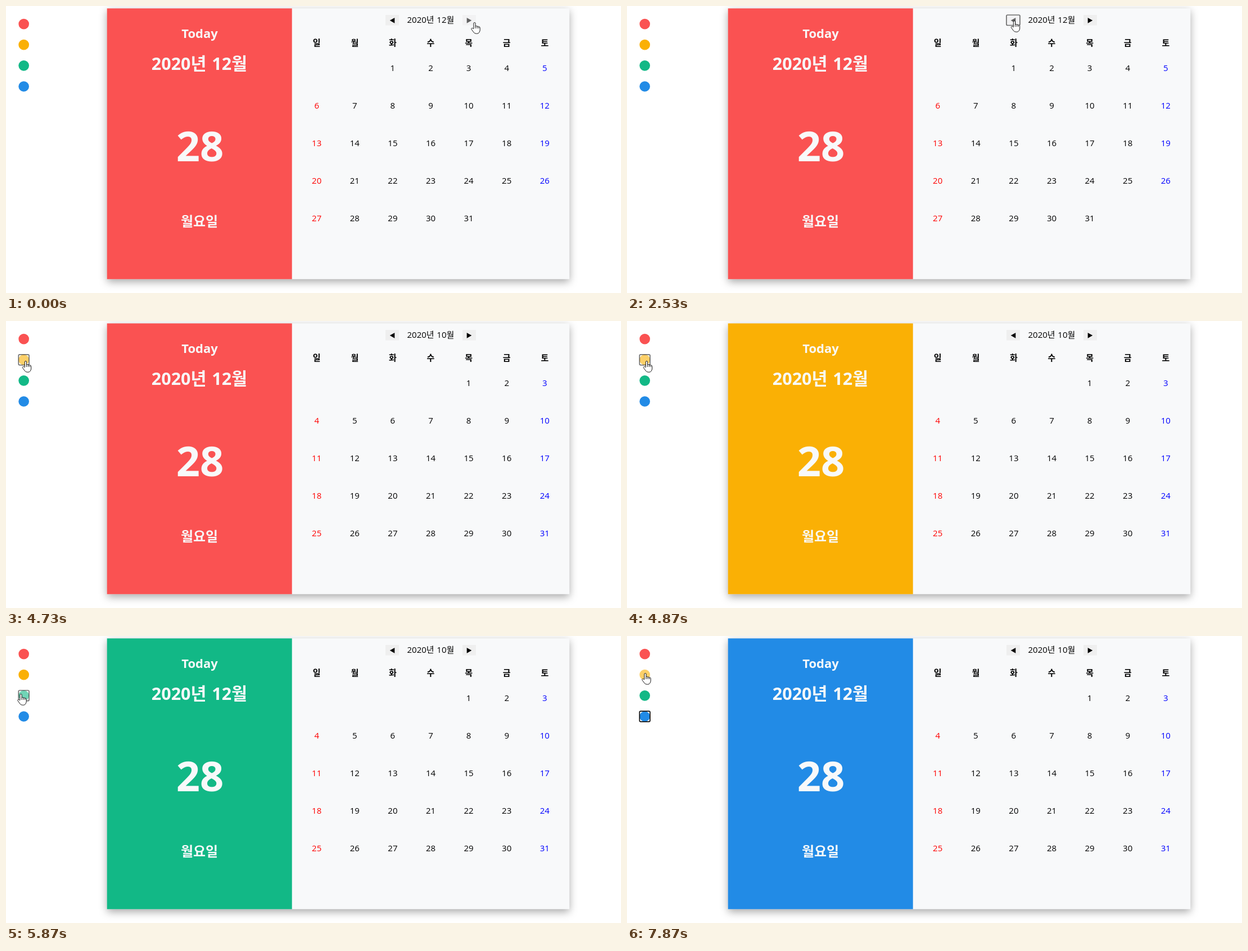
These frames come from a looping animation (1094 by 512 pixels, 8000 ms). An HTML page with a canvas:

```html
<!DOCTYPE html>
<html lang="ko">
<head>
<meta charset="utf-8">
<style>
  html, body { margin: 0; width: 100%; height: 100%; overflow: hidden; background: #fff; }
  canvas { display: block; }
</style>
</head>
<body>
<canvas id="stage" width="1094" height="512"></canvas>
<script>
const ctx = document.getElementById('stage').getContext('2d');
const FONT = '"Open Sans", "Noto Sans CJK KR", "Noto Sans CJK", sans-serif';
const LOOP = 8000, TICKS_PER_SECOND = 15;
const COLORS = ['#fa5252', '#fab005', '#12b886', '#228be6'];
const DAYS = [...'일월화수목금토'];

// Mouse presses, in ticks. An arrow loses focus on release, a dot keeps it.
const click = (down, up, id) => ({ down, up, id });
const CLICKS = [
  click(1, 1, 'next'), click(13, 14, 'next'),
  click(28, 29, 'prev'), click(32, 34, 'prev'), click(38, 39, 'prev'), click(42, 44, 'prev'),
  click(71, 73, 1), click(87, 88, 2), click(99, 101, 3)
];

// Pointer trips: eased from the previous stop, bowed sideways by (bowX, bowY).
const trip = (start, end, x, y, bowX = 0, bowY = 0) => ({ start, end, x, y, bowX, bowY });
const TRIPS = [
  trip(0, 0, 833.5, 29.5),
  trip(4, 11, 828, 29),
  trip(14, 25, 689, 26.5),
  trip(51, 64, 38, 93, 0, 110),
  trip(64, 70, 35, 71.5),
  trip(76, 86, 26.5, 103.5, -5),
  trip(90, 98, 33.7, 134.5, -20),
  trip(106, 118, 32.5, 66.5, 34, -20)
];

const HAND = new Path2D('M-1.6 11V1.6Q-1.6 0 0 0T1.6 1.6V7Q1.8 5.8 3.1 5.9T4.6 7.4Q4.8 6.4 6 6.6T7.4 8' +
  'Q7.7 7.2 8.6 7.5T9.7 9.2V13.5Q9.7 15.5 8.2 17.6Q7.4 19.8 4 19.8Q0 19.8-1.3 17.8L-5.4 12.2' +
  'Q-6.2 10.7-5 10.1T-2.8 10.6ZM1.6 7V10.5M4.6 7.4V10.5M7.4 8V10.5');
const ARROW = new Path2D('M0 0V15.6L3.6 12.2L6.1 18L8.5 17L6.1 11.3H11Z');

function pointerAt(tick) {
  const i = TRIPS.findLastIndex(t => t.start <= tick);
  const to = TRIPS[i], from = TRIPS[Math.max(i - 1, 0)];
  const k = Math.min(1, (tick - to.start) / (to.end - to.start || 1));
  const ease = k * k * (3 - 2 * k), bow = Math.sin(Math.PI * k);
  return [from.x + (to.x - from.x) * ease + to.bowX * bow, from.y + (to.y - from.y) * ease + to.bowY * bow];
}

function stateAt(tick) {
  const state = { months: 0, theme: 0, focus: null };
  for (const { down, up, id } of CLICKS) {
    const isDot = typeof id === 'number', released = tick >= up;
    if (tick >= down) state.focus = isDot || !released ? id : null;
    if (!released) continue;
    if (isDot) state.theme = id;
    else state.months += id === 'next' ? 1 : -1;
  }
  return state;
}

function text(value, x, y, size, color, weight = 400) {
  ctx.font = `${weight} ${size}px ${FONT}`;
  ctx.wordSpacing = `${size * 0.06}px`;
  ctx.fillStyle = color;
  ctx.fillText(value, x, y);
}

function box(x, y, w, h, color) {
  ctx.fillStyle = color;
  ctx.fillRect(x, y, w, h);
}

function drawButton({ x, y, w, h, dir, color }, hovered, focused) {
  const cx = x + w / 2, cy = y + h / 2;
  ctx.globalAlpha = hovered ? 0.6 : 1;
  if (dir) {
    box(x, y, w, h, '#efefef');
    ctx.fillStyle = '#000';
    ctx.beginPath();
    ctx.moveTo(cx + 4.3 * dir, cy + 0.6);
    ctx.lineTo(cx - 4.3 * dir, cy - 4.2);
    ctx.lineTo(cx - 4.3 * dir, cy + 5.4);
    ctx.fill();
  } else {
    ctx.fillStyle = color;
    ctx.beginPath();
    ctx.arc(cx, cy, w / 2, 0, 7);
    ctx.fill();
  }
  if (focused) {
    ctx.strokeStyle = '#101010';
    ctx.lineWidth = 1.7;
    ctx.beginPath();
    ctx.roundRect(x, y, w, h, 2);
    ctx.stroke();
  }
  ctx.globalAlpha = 1;
}

function drawPanel(color) {
  ctx.save();
  ctx.shadowOffsetY = 4.7;
  ctx.shadowBlur = 14;
  ctx.shadowColor = 'rgba(0,0,0,.35)';
  box(179.7, 4.3, 822.6, 483, '#f8f9fa');
  ctx.restore();
  box(179.7, 4.3, 329, 483, color);
  text('Today', 344.5, 56.5, 22, '#f8f9fa', 700);
  text('2020년 12월', 344, 114, 30.5, '#f8f9fa', 700);
  text('28', 345, 277, 74, '#f8f9fa', 700);
  text('월요일', 344, 393, 24, '#f8f9fa', 700);
}

function drawCalendar(year, month) {
  const columnX = i => 552.7 + 67.6 * i;
  text(`${year}년 ${month + 1}월`, 755.4, 29.5, 15, '#000');
  DAYS.forEach((day, i) => text(day, columnX(i), 71, 15, '#000', 700));
  const offset = new Date(year, month, 1).getDay();
  const count = new Date(year, month + 1, 0).getDate();
  for (let day = 1; day <= count; day++) {
    const cell = offset + day - 1, column = cell % 7;
    const color = column === 0 ? '#f00' : column === 6 ? '#00f' : '#000';
    text(day, columnX(column), 116 + 66.9 * Math.floor(cell / 7), 15, color);
  }
}

function drawPointer(x, y, shape) {
  ctx.save();
  ctx.translate(x, y);
  ctx.fillStyle = '#fff';
  ctx.strokeStyle = '#000';
  ctx.lineWidth = 0.9;
  ctx.fill(shape);
  ctx.stroke(shape);
  ctx.restore();
}

function draw(tick) {
  const { months, theme, focus } = stateAt(tick);
  const date = new Date(2020, 11 + months, 1);
  const [px, py] = pointerAt(tick);
  const inset = date.getMonth() < 9 ? 4.3 : 0; // a one-digit month narrows the heading
  const buttons = [
    ...COLORS.map((color, id) => ({ id, color, x: 22.3, y: 22.7 + 37.15 * id, w: 18.7, h: 18.7 })),
    { id: 'prev', dir: -1, x: 675 + inset, y: 16, w: 24, h: 18.5 },
    { id: 'next', dir: 1, x: 812 - inset, y: 16, w: 24, h: 18.5 }
  ];
  const hit = buttons.find(b => px >= b.x && px <= b.x + b.w && py >= b.y && py <= b.y + b.h);

  box(0, 0, 1094, 512, '#fff');
  ctx.textAlign = 'center';
  drawPanel(COLORS[theme]);
  drawCalendar(date.getFullYear(), date.getMonth());
  buttons.forEach(b => drawButton(b, b === hit, b.id === focus));
  drawPointer(px, py, hit ? HAND : ARROW);
}

function loop() {
  const time = performance.now() % LOOP;
  draw(Math.floor((time + 5) * TICKS_PER_SECOND / 1000) % (LOOP * TICKS_PER_SECOND / 1000));
  requestAnimationFrame(loop);
}
loop();
</script>
</body>
</html>
```
